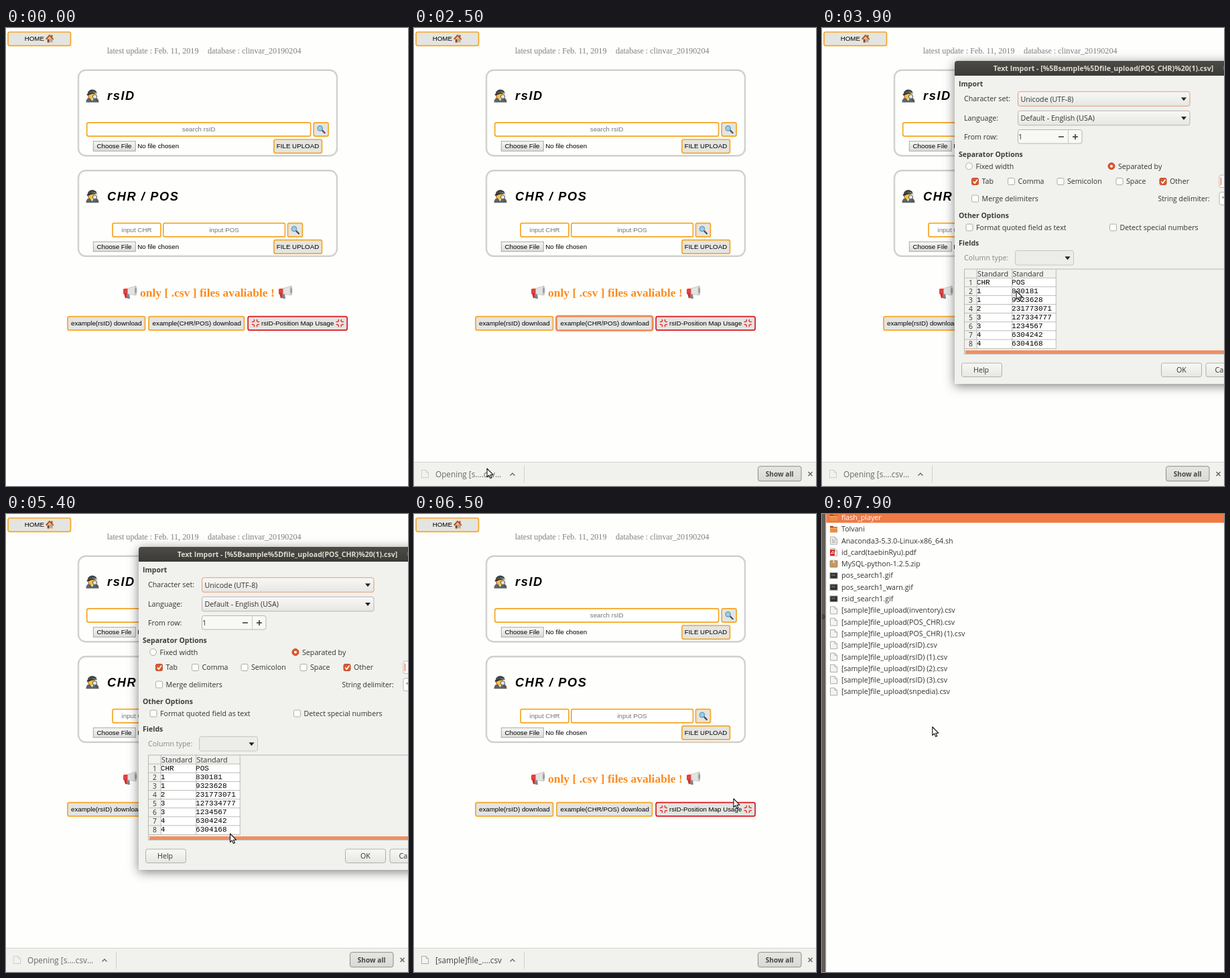
These frames come from a looping animation (600x682 px, 8 s). An HTML page:

```html
<!DOCTYPE html>
<html lang="en">
<head>
<meta charset="utf-8">
<title>rsID and position upload</title>
<style>
  html, body { margin: 0; width: 100%; height: 100%; overflow: hidden; background: #fefefc; }
  svg { display: block; width: 600px; height: 682px; }
  text { white-space: pre; }
  .arial { font-family: "Liberation Sans", Arial, sans-serif; }
  .times { font-family: "Liberation Serif", "Times New Roman", serif; }
  .mono { font-family: "Liberation Mono", "Courier New", monospace; }
  .ui { font-family: "Open Sans", "Noto Sans", sans-serif; }
  #dialog { filter: drop-shadow(0 3px 8px rgba(0, 0, 0, .5)); }
</style>
</head>
<body>
<svg id="stage" viewBox="0 0 600 682" xmlns="http://www.w3.org/2000/svg"></svg>
<script>
const LOOP = 8000, STEP = 100;
const ORANGE = '#f6a623', GREY = '#e4e4e1', INK = '#333331', PANEL = '#f1f1ee';

// Drawing helpers
const text = (x, y, s, size, fill = '#000', cls = 'ui', extra = '') =>
  `<text class="${cls}" x="${x}" y="${y}" font-size="${size}" fill="${fill}" ${extra}>${s}</text>`;
const ui = (x, y, s, fill = INK, size = 10.7) => text(x, y, s, size, fill);
const bold = (x, y, s, fill = '#3c3c3a', size = 10.5) => text(x, y, s, size, fill, 'ui', 'font-weight="700"');
const arial = (x, y, s, fill = '#000', extra = '') => text(x, y, s, 9.75, fill, 'arial', extra);
const box = (x, y, w, h, fill, stroke = 'none', sw = 1, r = 0, extra = '') =>
  `<rect x="${x}" y="${y}" width="${w}" height="${h}" rx="${r}" fill="${fill}" stroke="${stroke}" stroke-width="${sw}" ${extra}/>`;
const path = (d, fill, stroke = 'none', sw = 1, extra = '') =>
  `<path d="${d}" fill="${fill}" stroke="${stroke}" stroke-width="${sw}" ${extra}/>`;
const disc = (x, y, r, fill, stroke = 'none', sw = 1) =>
  `<circle cx="${x}" cy="${y}" r="${r}" fill="${fill}" stroke="${stroke}" stroke-width="${sw}"/>`;
const at = (x, y, body) => `<g transform="translate(${x} ${y})">${body}</g>`;
const group = (id, body) => `<g id="${id}">${body}</g>`;

// Small pictures
const detective = (x, y) => at(x, y,
  path('M1 20Q1 13 7 13H14Q20 13 20 20Z', '#5c6468') +
  path('M7 13L10 18L13 13Z', '#e8e8e4') +
  path('M4 7Q3 13 6 14H8L8 7Z', '#c0622b') +
  disc(10, 10, 5, '#fbc43a') +
  path('M4 4Q9 -2 16 3L17 6Q10 3 3 8Z', '#3f474c') +
  path('M2 8Q9 3 19 7Q11 6 3 10Z', '#2c3338') +
  path('M15 14L18 18', 'none', '#7b4a2b', 2) +
  disc(14, 11.5, 3.2, '#cfe8f5', '#555', 1));
const lens = (x, y) => at(x, y,
  path('M1 1L5.5 5.5', 'none', '#3f5058', 2.2, 'stroke-linecap="round"') +
  disc(-1.5, -1.5, 3.7, '#8fd0f7', '#7c97a8', 1.3));
const megaphone = (x, y) => at(x, y,
  path('M5 12L9 11L10 19H6Z', '#7b8790') +
  path('M6 4L19 0V14L6 12Z', '#e3e3e1', '#b4b4b2', .6) +
  path('M0 5.5Q0 4 2 4H6.5V12L2 12.5Q0 12.5 0 11Z', '#e5413a') +
  path('M1 11L3 18.5L6 17.5L5 11Z', '#c9322f') +
  `<ellipse cx="18.5" cy="7" rx="2" ry="7" fill="#c3c5c6"/><ellipse cx="18.7" cy="7" rx="1" ry="4" fill="#8c9297"/>`);
const anger = (x, y) => at(x, y, [0, 90, 180, 270].map(a =>
  path('M-5 -2Q-1.4 -1.4 -2 -5', 'none', '#e3302c', 1.5, `transform="rotate(${a})" stroke-linecap="round"`)).join(''));
const house = (x, y) => at(x, y,
  box(2, 5, 9, 7, '#e0b07c') + path('M0 6.5L6 0L12.5 7L11 8L6 3L1.5 8Z', '#b5512b') +
  box(8.5, 1, 2, 3, '#8c4a2d') + box(3, 7.5, 2.5, 4.5, '#7a4428') + box(7, 7.5, 2.8, 2.5, '#6cb1d8'));
const sheet = (x, y, mark = '') => at(x, y,
  path('M.5 .5H7L10.5 4V11.5H.5Z', '#f4f4f2', '#a2a29e', .9) + path('M7 .5V4H10.5', 'none', '#a2a29e', .8) + mark);
const chevron = (x, y) => path(`M${x} ${y}l3.5 -3.5l3.5 3.5`, 'none', '#666', 1.4);
const cross = (x, y) => path(`M${x - 3} ${y - 3}l6 6m0 -6l-6 6`, 'none', '#66665f', 1.5);

// Web page
const frame = (x, y, w, fill, stroke = ORANGE) => box(x, y, w, 20.3, fill, stroke, 1.7, 2.5);
const button = (x, y, w, label, tx, stroke) => frame(x, y, w, GREY, stroke) + arial(tx, y + 13, label);
const field = (x, y, w, hint) => frame(x, y, w, '#fff') +
  arial(x + w / 2, y + 13.3, hint, '#757575', 'text-anchor="middle"');
const lensButton = (x, y) => frame(x, y, 22, GREY) + lens(x + 11, y + 10);
const card = (y, title, fields) =>
  box(108, y + 1, 386, 127.5, '#fefefc', '#d0d0ce', 2.4, 11) + detective(118.5, y + 29) +
  text(151, y + 45.5, title, 18.2, '#000', 'arial', 'font-weight="700" font-style="italic" letter-spacing="1.6"') +
  fields + box(130.3, y + 107, 63, 14.5, 'url(#chrome)', '#a0a09e', .9) +
  arial(135.5, y + 117.3, 'Choose File') + arial(196.3, y + 117.3, 'No file chosen') +
  button(400, y + 104.3, 71.5, 'FILE UPLOAD', 403.8);

const page = box(0, 0, 600, 682, '#fefefc') +
  button(3, 6, 93.5, 'HOME', 27.7) + house(59, 9.5) +
  text(150.7, 38, 'latest update : Feb. 11, 2019', 12.15, '#80807e', 'times') +
  text(301, 38, 'database : clinvar_20190204', 12.15, '#80807e', 'times') +
  card(61.7, 'rsID', field(120.7, 140.8, 334, 'search rsID') + lensButton(459.2, 140.8)) +
  card(211.3, 'CHR / POS', field(159, 290.6, 72, 'input CHR') + field(234.8, 290.6, 181.7, 'input POS') + lensButton(420.5, 290.6)) +
  megaphone(175, 384) + megaphone(407, 384) +
  text(200, 399.5, 'only [ .csv ] files avaliable !', 17.5, '#ff8a1c', 'times', 'font-weight="700"') +
  button(92, 429.6, 115.5, 'example(rsID) download', 97) +
  button(213, 429.6, 142.5, 'example(CHR/POS) download', 218.6) +
  button(361.2, 429.6, 148, 'rsID-Position Map Usage', 381, '#dc1620') +
  anger(372.5, 439.5) + anger(498.3, 439.5) +
  group('ring', box(212.3, 429, 144, 21.4, 'none', '#f08a5c', 2.4, 3) + box(211.2, 428, 146, 23.4, 'none', '#f08a5c55', 1.4, 4));

// Download shelf
const shelf = box(0, 646, 600, 37, PANEL) + path('M0 646.5H600', 'none', '#d4d4d0') +
  group('file', sheet(11, 658)) +
  `<text id="name" class="ui" x="32" y="669" font-size="11.75"></text>` +
  group('chev', chevron(143.5, 666.5)) + `<path id="split" d="M0 651.5V677.5" stroke="#d2d2ce"/>` +
  box(513.5, 652.7, 64.5, 22, 'url(#dark)', '#8e8e88', 1, 3) + bold(524.8, 667.5, 'Show all', '#484845', 10.1) + cross(591.5, 664);
const status = path('M0 630H194Q198.5 630 198.5 634V646H0Z', '#f0f0ed', '#d4d4d0', .8) +
  ui(-1, 641.7, '10.39.2.222:8001/…/file_downloadPC/', '#6a6a67', 10.8);
const arrow = disc(22, 651, 26, '#ffffff99') +
  path('M19.5 635.5H25.5V642H30L22.5 650L15 642H19.5Z', '#5a9be0') + box(10, 660, 24, 2.6, '#5a9be0');

// Splash and import window
const splash = path('M238 0H601V29H242Q238 29 238 25Z', '#3d3c38') +
  box(256, -4, 73, 24, '#2c2b28', 'none', 1, 3) + box(259, -4, 67, 21, '#bcbcb9') + box(263, -4, 59, 17, '#ececea');

const check = (x, y, label, on) => box(x + .5, y - 5, 10, 10, on ? '#e2572b' : '#fcfcfa', on ? '#b8441f' : '#a5a5a0', .9, 2) +
  (on ? path(`M${x + 2.8} ${y}l2.2 2.6l4 -5.4`, 'none', '#fff', 1.7) : '') + ui(x + 15.5, y + 3.8, label);
const radio = (x, y, label, on) => disc(x, y, 5, on ? '#e2572b' : '#fcfcfa', on ? '#b8441f' : '#a5a5a0', .9) +
  (on ? disc(x, y, 2, '#fff') : '') + ui(x + 10, y + 4, label);
const combo = (x, y, w, label, fill = 'url(#grey)', stroke = '#b5b5b0') => box(x, y, w, 21.5, fill, stroke, 1, 3) +
  ui(x + 4, y + 14.7, label) + path(`M${x + w - 13} ${y + 8.7}h8l-4 5z`, '#222');
const wide = (x, y, w, label, tx) => box(x, y, w, 20.5, 'url(#grey)', '#b0b0aa', 1, 3) + ui(tx, y + 14.3, label);

const rows = [['CHR', 'POS'], [1, 830181], [1, 9323628], [2, 231773071], [3, 127334777], [3, 1234567], [4, 6304242], [4, 6304168]];
const rowY = i => 372.2 + 13.1 * i;
const cell = (x, y, s) => text(x, y, s, 11.1, '#000', 'mono');
const grid = box(212.5, 359, 400, 126.5, PANEL, '#b8b8b3') +
  box(231, 372, 118.5, 106, '#fff') +
  rows.map(([a, b], i) => path(`M213 ${rowY(i)}H349.5`, 'none', '#b5b5b0', .9) +
    text(222, rowY(i) + 10.4, i + 1, 10.3, INK, 'ui', 'text-anchor="middle"') +
    cell(230.8, rowY(i) + 9.3, a) + cell(283, rowY(i) + 9.3, b)).join('') +
  path('M213 477.5H349.5M231.2 359V478M283.8 359V478M349.3 359V478', 'none', '#b5b5b0', .9) +
  ui(232, 370, 'Standard', INK, 10.9) + ui(284.5, 370, 'Standard', INK, 10.9) +
  box(214, 480, 400, 5, '#ec9163');

const dialog = path('M198 530V53Q198 49 202 49H640V530Z', PANEL) +
  path('M198 71V53Q198 49 202 49H640V71Z', 'url(#bar)') +
  bold(255.8, 63.6, 'Text Import - [%5Bsample%5Dfile_upload(POS_CHR)%20(1).csv]', '#dfdbd2', 10.6) +
  disc(605, 59.5, 6.5, '#6a6963') +
  bold(204, 87, 'Import') + ui(212, 109.3, 'Character set:') + combo(292.5, 94.8, 256.5, 'Unicode (UTF-8)', 'url(#grey)', '#e59a78') +
  ui(212, 137.8, 'Language:') + combo(292.5, 123.3, 256.5, 'Default - English (USA)') +
  ui(212, 166, 'From row:') + box(292.5, 151.5, 95.5, 20.5, '#f8f8f5', '#b5b5b0', 1, 3) + ui(293, 166, '1') +
  path('M367.5 152V172', 'none', '#c8c8c3') + path('M353 162H361M374 162H382M378 158V166', 'none', '#333', 1.5) +
  bold(204, 192, 'Separator Options') + radio(219.5, 205.7, 'Fixed width') + radio(432, 205.7, 'Separated by', true) +
  check(223, 228.5, 'Tab', true) + check(277, 228.5, 'Comma') + check(350.5, 228.5, 'Semicolon') +
  check(438.5, 228.5, 'Space') + check(503.5, 228.5, 'Other', true) +
  box(593, 219, 40, 18.5, '#fff', '#b5b5b0', 1, 3) + path('M595.5 222.5V234', 'none', '#e2572b') +
  check(223, 254, 'Merge delimiters') + ui(501.5, 257.8, 'String delimiter:', INK, 10.4) +
  box(593, 244.5, 40, 19, '#fff', '#b5b5b0', 1, 3) + ui(597, 259, '"') +
  bold(204, 283, 'Other Options') + check(214.5, 297, 'Format quoted field as text') + check(429, 297, 'Detect special numbers') +
  bold(204, 323.5, 'Fields') + ui(212, 346, 'Column type:', '#888883') + combo(288.5, 331.5, 87, '', '#ecece8', '#c6c6c1') +
  grid + wide(208.5, 499, 60, 'Help', 226) + wide(506.5, 499, 60, 'OK', 529) + wide(573, 499, 60, 'Cancel', 586.5) +
  group('press', box(573, 511, 60, 9, '#d6d6d1', '#b0b0aa', 1, 3));

// File list: kind and name
const files = [
  ['dir', 'flash_player'], ['dir', 'Tolvani'], ['sh', 'Anaconda3-5.3.0-Linux-x86_64.sh'], ['pdf', 'id_card(taebinRyu).pdf'],
  ['zip', 'MySQL-python-1.2.5.zip'], ['gif', 'pos_search1.gif'], ['gif', 'pos_search1_warn.gif'], ['gif', 'rsid_search1.gif'],
  ...['(inventory)', '(POS_CHR)', '(POS_CHR) (1)', '(rsID)', '(rsID) (1)', '(rsID) (2)', '(rsID) (3)', '(snpedia)']
    .map(s => ['csv', `[sample]file_upload${s}.csv`])];
const icons = {
  dir: (x, y) => at(x, y, path('M0 1.5H4L5.5 3H11V11H0Z', '#a9501f') + box(0, 4.5, 11, 6.5, '#ee8d42') + path('M0 4.7H11', 'none', '#f9d3ae', .8)),
  sh: (x, y) => sheet(x, y, path('M2.5 4H5M2.5 6.3H8.5M2.5 8.6H8.5', 'none', '#8a8a88', .9)),
  pdf: (x, y) => sheet(x, y, box(0, 2, 7, 9, '#cf2b23', 'none', 1, 1) + path('M1.5 9L4 4L6 8L1.5 7.5', 'none', '#fff', .8)),
  zip: (x, y) => at(x, y, box(0, 1, 11, 10, '#c29a66', '#a27c4b', .8, 1) + box(4.5, 1, 2, 4, '#ecdcc0')),
  gif: (x, y) => at(x, y, box(0, 2, 11, 8.5, '#2c2c2c', '#8d8d8b', 1) + box(2, 4, 6, 3, '#55575a')),
  csv: (x, y) => sheet(x, y)
};
const list = box(0, 0, 600, 682, '#fefefd') + box(0, 0, 5.5, 682, '#625e57') + disc(1, 153, 4, '#48453f') +
  path('M5.8 0V682', 'none', '#b0aca5', .9) + box(6.3, -5, 600, 18, '#ef7a45') +
  files.map(([kind, name], i) => {
    const y = 5 + 17.3 * i;
    return icons[kind](12, y - 6) + ui(29, y + 3.9, name, i ? INK : '#fff');
  }).join('');

const gradient = (id, a, b) => `<linearGradient id="${id}" x2="0" y2="1"><stop stop-color="${a}"/><stop offset="1" stop-color="${b}"/></linearGradient>`;
document.getElementById('stage').innerHTML =
  `<defs>${gradient('chrome', '#f6f6f5', '#dcdcda')}${gradient('grey', '#f8f8f6', '#e6e6e2')}${gradient('dark', '#e6e6e2', '#d8d8d4')}${gradient('bar', '#4d4b46', '#3b3a36')}</defs>` +
  page + group('status', status) + group('shelf', shelf) + group('arrow', arrow) +
  group('splash', splash) + group('dialog', dialog) + group('list', list) +
  group('cursor', path('M0 0V12.6L2.9 10L4.9 14.6L7 13.7L5 9.2H9Z', '#fff', '#111', 1.1, 'stroke-linejoin="round"'));

// Motion
const el = id => document.getElementById(id);
const ramp = (t, a, b) => Math.min(1, Math.max(0, (t - a) / (b - a)));
const show = (id, alpha) => {
  el(id).style.display = alpha > 0 ? '' : 'none';
  el(id).style.opacity = alpha;
};
const move = (id, x, y) => el(id).setAttribute('transform', `translate(${x} ${y})`);

// Pointer tracks: time, x, y
const tracks = [
  [[100, 431, 291], [500, 350, 385], [900, 300, 439], [1500, 297, 442.5], [1600, 292, 446], [1800, 253, 490], [2300, 118, 648], [2700, 100, 664], [2900, 92, 690]],
  [[3600, 595, 420], [3900, 290, 391.5], [4300, 254, 387.5], [4500, 259, 387.5], [4700, 262, 391], [5000, 300, 440], [5400, 334.5, 476], [5500, 420, 487], [5800, 601, 507]],
  [[6200, 585, 496], [6500, 477, 424], [7000, 173, 327], [7200, 164.8, 322], [7800, 164.8, 322], [7900, 164.8, 317], [8000, 164.8, 317]]];

function pointer(t) {
  const track = tracks.find(p => t >= p[0][0] && t <= p[p.length - 1][0]);
  if (!track) return null;
  const i = Math.max(1, track.findIndex(p => p[0] >= t));
  const [a, b] = [track[i - 1], track[i]], k = ramp(t, a[0], b[0]);
  return [a[1] + (b[1] - a[1]) * k, a[2] + (b[2] - a[2]) * k];
}

function draw(t) {
  const rise = 36 * (1 - ramp(t, 1000, 1300));
  const opening = t >= 2500 && t < 5500;
  show('ring', t >= 1000 && t < 6200 ? 1 : 0);
  show('status', t >= 700 ? 1 - ramp(t, 1600, 1900) : 0);
  move('status', 0, rise);
  show('shelf', t >= 1000 ? 1 : 0);
  move('shelf', 0, rise);
  el('name').textContent = opening ? 'Opening [s....csv…' : '[sample]file_....csv';
  el('name').setAttribute('fill', opening ? '#686865' : '#454542');
  el('file').style.opacity = opening ? .5 : Math.max(.35, ramp(t, 1400, 1700));
  el('split').setAttribute('transform', `translate(${141.5 + 23 * ramp(t, 1500, 1700)} 0)`);
  show('chev', t >= 1700 ? 1 : 0);
  show('arrow', t >= 1100 && t < 1800 ? .95 - .25 * ramp(t, 1400, 1800) : 0);
  move('arrow', 0, -40 * (1 - ramp(t, 1100, 1500)) + 20 * ramp(t, 1500, 1800));
  show('splash', t < 3500 ? ramp(t, 2900, 3200) : 0);
  show('dialog', ramp(t, 3400, 3700) * (1 - ramp(t, 6100, 6400)));
  show('press', t >= 6000 ? 1 : 0);
  show('list', ramp(t, 7000, 7400));
  const p = pointer(t);
  show('cursor', p ? 1 : 0);
  if (p) move('cursor', ...p);
}

const start = performance.now();
function loop() {
  const t = (performance.now() - start) % LOOP;
  draw(Math.floor(t / STEP) * STEP);
  requestAnimationFrame(loop);
}
draw(0);
requestAnimationFrame(loop);
</script>
</body>
</html>
```
